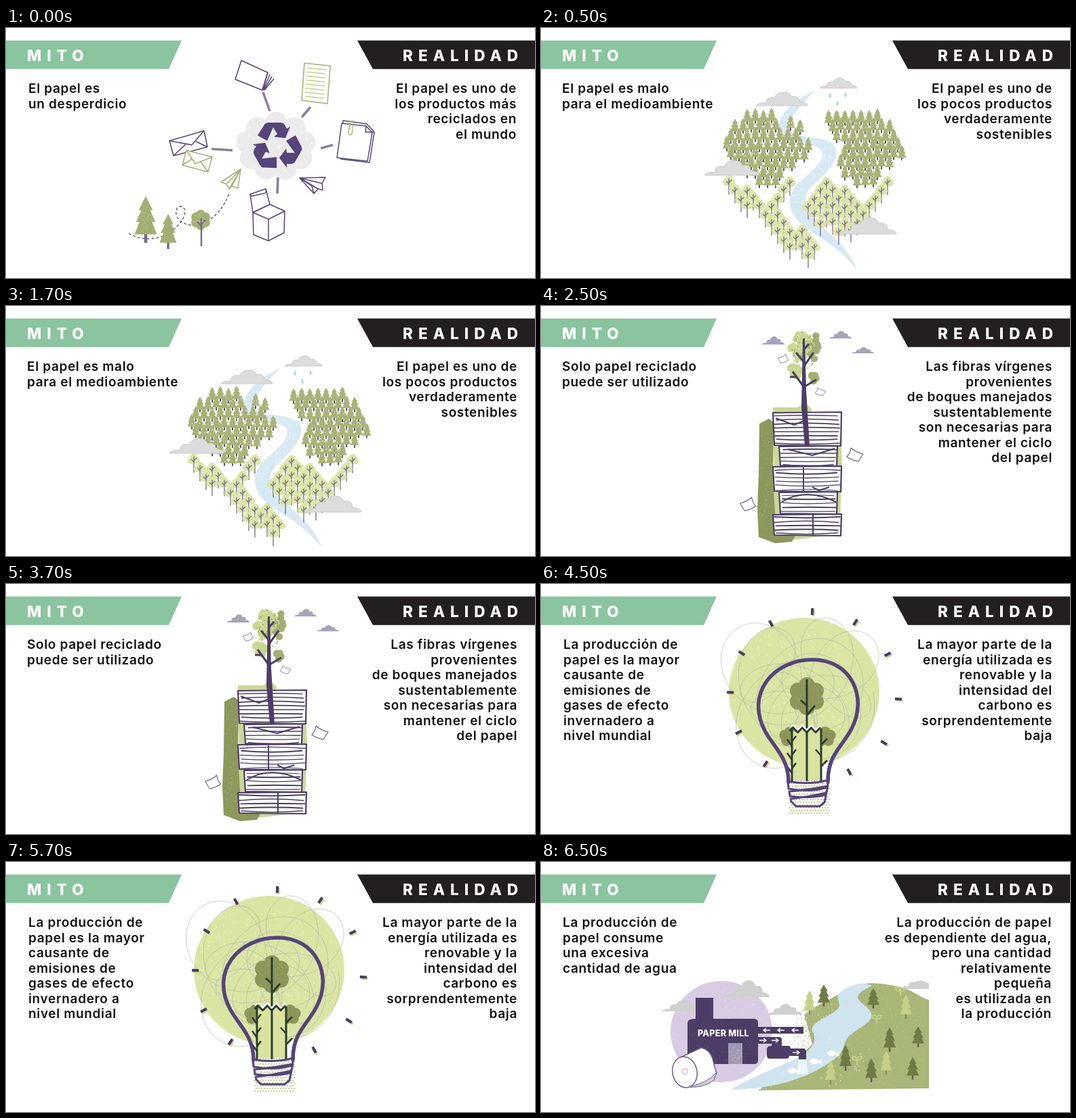
Recreate the animation shown at these times as an HTML page. Size 780 by 370 pixels, loop 8 s.

```html
<!DOCTYPE html>
<html lang="es">
<head>
<meta charset="utf-8">
<style>
html, body { margin: 0; width: 100%; height: 100%; overflow: hidden; background: #fff; }
svg { display: block; width: 780px; height: 370px; }
text { font: 600 19px Inter, "Open Sans", sans-serif; letter-spacing: .65px; fill: #111; }
.head { font-size: 22.5px; font-weight: 800; letter-spacing: 8px; fill: #fff; }
.mill { font-size: 12.5px; font-weight: 800; letter-spacing: .3px; fill: #fff; }
.end { text-anchor: end; }
</style>
</head>
<body>
<svg id="stage" viewBox="0 0 780 370"></svg>
<script>
const PURPLE = '#56447a', DARK = '#4c3d66', OLIVE = '#a3af72', PALE = '#dce6a8', GRAY = '#dcdcdc';
const {sin, cos, abs, sqrt, PI} = Math;

let seed = 7;
const rnd = () => (seed = seed * 16807 % 2147483647) / 2147483647;
const range = (n, f) => Array.from({length: n}, (_, i) => f(i)).join('');
const points = (s, f) => s.split(' ').map(p => f(...p.split(',').map(Number))).join('');

const path = (d, fill = 'none', stroke = 'none', w = 1.5, more = '') =>
  `<path d="${d}" fill="${fill}" stroke="${stroke}" stroke-width="${w}" stroke-linejoin="round" ${more}/>`;
const line = (d, color = PURPLE, w = 1.5, more = '') => path(d, 'none', color, w, more);
const ink = (d, color = PURPLE, w = 1.5) => path(d, '#fff', color, w);
const disc = (x, y, r, fill) => `<circle cx="${x}" cy="${y}" r="${r}" fill="${fill}"/>`;
const text = (x, y, s, c = '') => `<text x="${x}" y="${y}" class="${c}">${s}</text>`;

// Random point in an ellipse
function spot(x, y, rx, ry) {
  const a = rnd() * 2 * PI, r = sqrt(rnd());
  return [(x + rx * r * cos(a)).toFixed(1), (y + ry * r * sin(a)).toFixed(1)];
}
const specks = (x, y, rx, ry, n, color, size = 1.2) =>
  line(range(n, () => `M${spot(x, y, rx, ry)}h${size}`), color, size);
const leaves = (x, y, rx, ry, n, r, color) => range(n, () => disc(...spot(x, y, rx, ry), r, color));
// Ring of lobes around a filled middle
const tuft = (x, y, rx, ry, n, r, color) => `<ellipse cx="${x}" cy="${y}" rx="${rx}" ry="${ry}" fill="${color}"/>` +
  range(n, i => disc(x + rx * cos(i * 2 * PI / n - PI / 2), y + ry * sin(i * 2 * PI / n - PI / 2), r, color));

const cloud = (x, y, w, h, fill = GRAY, edge = 'none') => path(
  'M0 1C.03 .8 .12 .8 .2 .78C.18 .4 .3 .35 .36 .42C.4 -.1 .65 -.15 .69 .35C.78 .25 .85 .4 .84 .72C.92 .7 1 .85 1 1Z',
  fill, edge, 1, `vector-effect="non-scaling-stroke" transform="translate(${x} ${y}) scale(${w} ${h})"`);

const pine = (x, y, w, h, fill, trunk = DARK) =>
  line(`M${x} ${y}v${-h * .3}`, trunk, Math.max(1.5, w * .14)) +
  path('M0 -1L.32 -.7H.2L.43 -.45H.28L.5 -.18H-.5L-.28 -.45H-.43L-.2 -.7H-.32Z', fill, 'none', 1,
    `transform="translate(${x} ${y}) scale(${w} ${h})"`);

const leafy = (x, y) => tuft(x, y, 4, 3, 3, 5.5, PALE) +
  line(`M${x} ${y - 4}v24m0 -16l-4 -4m4 2l4 -4`, '#75678a', 1.3);

function recycled() {
  const arrow = 'M371 159L381 143Q383 140 387 140H405Q409 140 412 145L414 149L419 146L412 163L395 161L400 157L394 147L385 167Z';
  return tuft(398, 175, 42, 34, 9, 17, '#ebebeb') + specks(398, 175, 52, 46, 150, '#fff') +
    range(3, i => path(arrow, PURPLE, 'none', 1, `transform="rotate(${i * 120} 399 175)"`)) +
    line('M379 95L389 123M449 117L436 132M482 173L464 178M401 221L400 245M303 179L334 181', '#8c7fa0', 3.6) +
    // book, list, clipped sheets
    ink('M347 48L386 66L378 92L338 76Z') + line(range(4, i => `M${378 + i} 92L${386 + i * 3} ${66 + i * 3}`)) +
    ink('M440 52L478 56L474 112L436 107Z', OLIVE) +
    line(range(8, i => `M${444 - i * .5} ${59 + i * 6}l28 3`), '#c5cf83') +
    ink('M497 137L532 142L543 154L536 199L494 194Z') + ink('M495 141L531 145L540 155L533 197L488 192Z') +
    line('M531 145L530 154L542 154') + line('M506 150L508 139Q512 135 512 141L510 157Q505 160 505 155L507 142', '#b1b87a') +
    // envelopes
    ink('M241 167L292 152L297 176L247 189Z') + line('M241 167L274 173L292 152M247 189L265 172M297 176L280 168') +
    ink('M266 181L304 191L298 213L260 203Z', OLIVE) + line('M266 181L279 201L304 191M260 203L274 194M298 213L287 198', OLIVE) +
    // planes
    ink('M346 209L317 228L325 231L329 238L333 234L342 237Z', OLIVE) + line('M325 231L346 209L329 238M346 209L333 234', OLIVE) +
    ink('M433 222L471 221L466 230L467 240L460 238L454 245L451 234Z') + line('M466 230L433 222L460 238M433 222L454 245') +
    // box
    ink('M364 273L389 261L411 271L410 303L387 315L365 306Z') + line('M364 273L387 283L411 271M387 283V315') +
    ink('M364 273L360 246L383 238L389 261Z') + line('M360 246Q361 250 366 248L380 245Q385 244 383 238') +
    line('M181 304C200 315 227 316 247 298C264 285 269 267 258 264C247 264 248 283 263 289C285 299 315 282 329 245', '#55506a', 1.3, 'stroke-dasharray="4 3"') +
    pine(206, 318, 33, 69, OLIVE, '#7a688f') + pine(239, 327, 25, 52, OLIVE, '#7a688f') +
    tuft(287, 284, 8, 8, 6, 7, OLIVE) + line('M288 323V281m0 12l-6 -6m6 3l6 -6', '#7a688f', 2.4) +
    specks(206, 288, 12, 16, 35, '#b9c58f') + specks(287, 285, 12, 12, 30, '#b9c58f');
}

function forest() {
  // Heart outline, winding river and the border between both kinds of trees
  const half = y => y < 200 ? 134 * sqrt(1 - ((y - 200) / 85) ** 2) : 134 * (1 - ((y - 200) / 148) ** 1.5);
  const river = y => 398 + 24 * cos((y - 192) / 66 * PI);
  const border = x => 252 - .9 * abs(abs(x - 402) - 72);
  const plant = (y0, y1, dx, dy, gap, fits, draw) => {
    let out = '';
    for (let y = y0, row = 0; y < y1; y += dy, row++)
      for (let x = 268 + row % 2 * dx / 2; x < 534; x += dx)
        if (abs(x - 399) < half(y) && abs(x - river(y)) > gap && fits(x, y)) out += draw(x, y + rnd() * 4 - 2);
    return out;
  };
  return path('M405 92C372 105 350 130 350 148C352 170 392 168 408 177C425 187 408 205 388 222C364 240 362 262 374 280C390 303 430 312 466 358C455 325 425 305 405 285C388 268 385 250 398 236C418 218 442 195 434 176C425 160 392 164 372 156C358 146 376 118 405 92Z', '#d7eaf4') +
    specks(400, 200, 32, 105, 130, '#fff') +
    plant(143, 262, 12, 13.5, 22, (x, y) => y < border(x) && (y > 165 || abs(x - 383) > 36), (x, y) => pine(x, y, 13, 23, '#aab377')) +
    points('368,152 382,158', (x, y) => pine(x, y, 13, 23, '#aab377')) +
    specks(400, 190, 135, 60, 200, '#fff') +
    plant(215, 340, 18, 12, 18, (x, y) => y > border(x) + 8, leafy) +
    cloud(317, 95, 76, 20, GRAY, '#cbc8c8') + cloud(411, 74, 55, 15, GRAY, '#cbc8c8') +
    cloud(241, 196, 81, 22, GRAY, '#cbc8c8') + cloud(440, 281, 84, 24, GRAY, '#cbc8c8') +
    points('426,95 449,94 437,107', (x, y) => path(`M${x} ${y}q-4 8 0 8t0 -8`, '#b5dbec'));
}

function stack() {
  const block = (x0, x1, y0, y1) =>
    ink(`M${x0} ${y0 + 1}L${x1} ${y0}L${x1 - 1} ${y1}L${x0 + 2} ${y1 - 1}Z`, DARK, 2.2) +
    range(Math.round((y1 - y0) / 6), i => {
      const y = y0 + 5 + i * 6, a = rnd() * 6 - 3;
      return line(`M${x0 + rnd() * 6} ${y + a / 2}Q${(x0 + x1) / 2} ${y - a} ${x1 - rnd() * 6} ${y + a / 2}`, DARK, 1 + rnd());
    });
  const sheet = (x, y, sx, sy) => path('M-6 -10Q0 -4 12 -1L5 10Q-6 8 -12 3Q-7 -2 -6 -10Z', '#fff', '#6d6185', 1.2,
    `transform="translate(${x} ${y}) scale(${sx} ${sy})"`);
  let top = 157;
  const pile = [50, 30, 38, 33, 32].map((h, i) =>
    block(i % 2 ? 351 : 342, i % 2 ? 437 : 443, top, top += h)).join('');
  return path('M342 150L378 150L390 144L399 152L398 160L441 165L444 240L440 338L372 346L345 338Z', '#cbd894') +
    path('M322 174L336 167L343 172L342 250L347 338L375 340L370 349L345 351L321 342L319 300L321 250Z', '#8c985c') +
    specks(330, 260, 12, 85, 60, '#a8b376') + pile +
    line('M355 290Q390 268 435 290M364 212L400 221L433 211M387 239V274M401 309V339M346 166L373 176L390 169M400 268L410 273L425 268', DARK, 2) +
    leaves(383, 60, 15, 20, 22, 6, '#cad790') + leaves(374, 97, 8, 7, 7, 6, '#cad790') +
    leaves(403, 61, 8, 20, 11, 5, OLIVE) + leaves(403, 106, 7, 6, 6, 5, OLIVE) +
    specks(389, 65, 20, 28, 45, '#8f9c56', 1.6) + specks(383, 62, 16, 24, 30, '#fff') +
    path('M386 48L389 48L391 125L396 207L389 207L384 150Z', DARK) +
    line('M387 119L371 97M389 119L406 109M387 82L376 69M389 87L402 69M376 105L367 105M388 64L395 56', DARK, 3) +
    points('326,45,12 425,37,11 458,61,9', (x, y, h) => cloud(x, y, 33, h, '#aaa2b9')) +
    sheet(357, 78, -.65, .65) + sheet(412, 127, .65, .6) + sheet(463, 220, 1, 1) + sheet(305, 293, -.95, 1);
}

function bulb() {
  const scribble = range(420, i => {
    const t = i * .2, r = 52 + 18 * sin(.83 * t);
    const x = 386 + 52 * cos(.31 * t) + r * cos(t), y = 160 + 46 * sin(.47 * t) + r * sin(t);
    return `${i ? 'L' : 'M'}${x.toFixed(1)} ${y.toFixed(1)}`;
  });
  const ray = i => {
    const a = i * PI / 6 + .04, r = 119 + 8 * sin(a);
    const x = 395 + r * sin(a), y = 165 - r * cos(a), d = `l${10 * sin(a)} ${-10 * cos(a)}`;
    return i == 6 ? '' : line(`M${x + 2} ${y + 2}${d}`, '#d9cf8a', 4) + line(`M${x} ${y}${d}`, '#453968', 4);
  };
  const tear = i => `L${372 + i * 6.6} ${i % 2 ? 219 : 212}`;
  return `<ellipse cx="388" cy="160" rx="111" ry="110" fill="#dae5a4"/>` +
    specks(388, 160, 117, 114, 300, '#eaf0cb', 1.6) + line(scribble, '#b3b5a5', 1, 'opacity=".65"') +
    line(range(13, r => range(15, i => `M${366 + i * 4 + r % 2 * 2} ${291 + r * 4}h2`)), '#c4cc91', 2) +
    tuft(392, 166, 15, 16, 6, 12, '#8d965a') + tuft(367, 226, 8, 7, 5, 8, '#8d965a') + tuft(419, 226, 8, 7, 5, 8, '#8d965a') +
    specks(392, 168, 24, 26, 40, '#a8b070') +
    path('M371 290V217L378 220L385 213L391 220L398 213L405 219L412 216V290Z', '#d8e39f') +
    line('M370 292V216M392 292V141M413 292V214M392 194L404 180M392 180L383 172', '#2c3d2d', 3) +
    line(range(3, i => `M370 ${240 + i * 20}l-7 -10m7 3l6 -8M413 ${238 + i * 16}l${i % 2 ? -8 : 9} -9`), '#2c3d2d', 2.6) +
    line('M367 218' + range(7, tear), '#2c3d2d', 4) +
    line('M367 215' + range(7, tear), '#fff', 2.3, 'transform="translate(0 -3)"') +
    line('M365 293C365 258 344 242 331 219C300 162 343 112 400 112C458 112 482 168 458 214C445 240 423 252 423 292', PURPLE, 5.5, 'stroke-linecap="round"') +
    line('M364 292Q395 298 424 290L422 301Q395 309 365 303ZM366 307Q398 304 423 299L420 312Q395 318 367 314ZM368 318Q395 315 421 309L418 323L411 329H376L369 322Z', PURPLE, 3) +
    range(12, ray);
}

function mill() {
  const arrow = (x, y, d) => line(`M${x - 5 * d} ${y}h${10 * d}m${-4 * d} -3l${4 * d} 3l${-4 * d} 3`, '#fff');
  const fish = (x, y) => path(`M${x - 9} ${y}q8 -8 15 0l4 -4l-1 5l1 4l-5 -3q-8 5 -14 -2Z`, '#fff');
  const sprout = (x, y) => line(`M${x} ${y + 8}v-7q-7 1 -7 -5q7 -1 7 5q0 -6 7 -5q0 6 -7 5`, '#c5d087', 2);
  return disc(266, 251, 75, '#d9cbe3') + specks(266, 251, 76, 76, 170, '#e7ddec', 1.4) +
    path('M388 226C410 208 432 202 451 188C468 177 500 178 524 184C548 188 560 202 572 204V335L320 338L345 320L400 270Z', '#a8b678') +
    specks(395, 250, 22, 45, 160, '#a8b678') + specks(490, 265, 82, 68, 230, '#bcc793') +
    path('M452 186C466 178 482 179 488 183C468 194 458 198 478 213C500 230 478 240 461 252C440 266 454 277 432 292C408 310 365 335 280 337C315 316 350 304 378 290C402 277 408 263 400 250C396 237 427 229 438 217C446 207 425 199 452 186Z', '#cfe4ee') +
    specks(410, 270, 75, 64, 110, '#e7f2f7') + specks(315, 330, 35, 7, 60, '#cfe4ee') +
    cloud(178, 204, 60, 17, '#d0d0d0') + cloud(271, 175, 66, 25, '#d0d0d0') + cloud(333, 210, 52, 16, '#d0d0d0') +
    path('M532 188Q535 183 542 184Q542 176 550 178Q560 172 572 180V188Z', '#d0d0d0') +
    // building and pipes
    path('M228 201H254V232H314Q320 232 320 238V293Q320 299 314 299H222Q216 299 216 293V238Q216 232 228 232Z', DARK) +
    path('M320 244H387V254H320ZM320 259H351Q355 259 355 263V272H364Q368 272 368 276H386Q391 276 391 281V292H380V287H366Q366 291 361 291H337Q333 291 333 286V277Q333 272 340 272V269H320Z', DARK) +
    specks(268, 265, 48, 30, 70, '#65557f') +
    path('M276 268H297V299H276Z', '#a199ae') + specks(287, 283, 9, 13, 30, '#c4bdca') +
    text(231, 258, 'PAPER MILL', 'mill') +
    range(3, i => arrow(333 + i * 21, 249, -1)) + arrow(327, 264, 1) + arrow(345, 264, 1) + arrow(376, 282, 1) +
    path('M380 293H391L394 314H377Z', '#edf6fa') +
    points('404,295 372,309 430,283', fish) +
    // paper roll
    ink('M204 290L236 275Q252 278 255 300L259 313L246 325L222 333Z', '#6d6185') +
    path('M216 333Q245 328 259 311L255 323Q240 335 216 333Z', '#d3cbd9', '#6d6185', 1) +
    `<ellipse cx="212" cy="311" rx="18" ry="23" fill="#fff" stroke="#6d6185" stroke-width="1.5" transform="rotate(-12 212 311)"/>` +
    disc(212, 310, 5, '#d9cbe3') + disc(212, 310, 3, '#fff') +
    points('417,214 490,217 514,281 556,274 449,309 487,326 548,322', (x, y) => pine(x, y, 18, 30 + rnd() * 9, '#6f7b45', '#665a56')) +
    points('396,226 538,232 427,329 509,315', (x, y) => pine(x, y, 17, 36, '#c5d087', '#8c8a5b')) +
    points('530,190 495,231 466,292', sprout);
}

// end time, drawing, left and right text edges, texts
const slides = [
  [500, recycled, 33, 753, 'El papel es|un desperdicio', 'El papel es uno de|los productos más|reciclados en|el mundo'],
  [2500, forest, 31, 754, 'El papel es malo|para el medioambiente', 'El papel es uno de|los pocos productos|verdaderamente|sostenibles'],
  [4500, stack, 31, 754, 'Solo papel reciclado|puede ser utilizado', 'Las fibras vírgenes|provenientes|de boques manejados|sustentablemente|son necesarias para|mantener el ciclo|del papel'],
  [6500, bulb, 33, 754, 'La producción de|papel es la mayor|causante de|emisiones de|gases de efecto|invernadero a|nivel mundial', 'La mayor parte de la|energía utilizada es|renovable y la|intensidad del|carbono es|sorprendentemente|baja'],
  [8000, mill, 32, 753, 'La producción de|papel consume|una excesiva|cantidad de agua', 'La producción de papel|es dependiente del agua,|pero una cantidad|relativamente|pequeña|es utilizada en|la producción']
];

const lines = (x, s, c) => s.split('|').map((t, i) => text(x, 96 + i * 22.5, t, c)).join('');
stage.innerHTML = path('M0 18.5H259L240 60.7H0Z', '#8ac59f') + path('M518 18.5H780V60.7H541Z', '#231f20') +
  text(31, 49, 'MITO', 'head') + text(763, 49, 'REALIDAD', 'head end') +
  slides.map(([, draw, x0, x1, myth, fact]) =>
    `<g class="slide">${draw()}${lines(x0, myth)}${lines(x1, fact, 'end')}</g>`).join('');

const groups = document.querySelectorAll('.slide');
function show() {
  const t = performance.now() % 8000, now = slides.findIndex(s => t < s[0]);
  groups.forEach((g, i) => g.style.display = i == now ? '' : 'none');
  requestAnimationFrame(show);
}
show();
</script>
</body>
</html>
```
